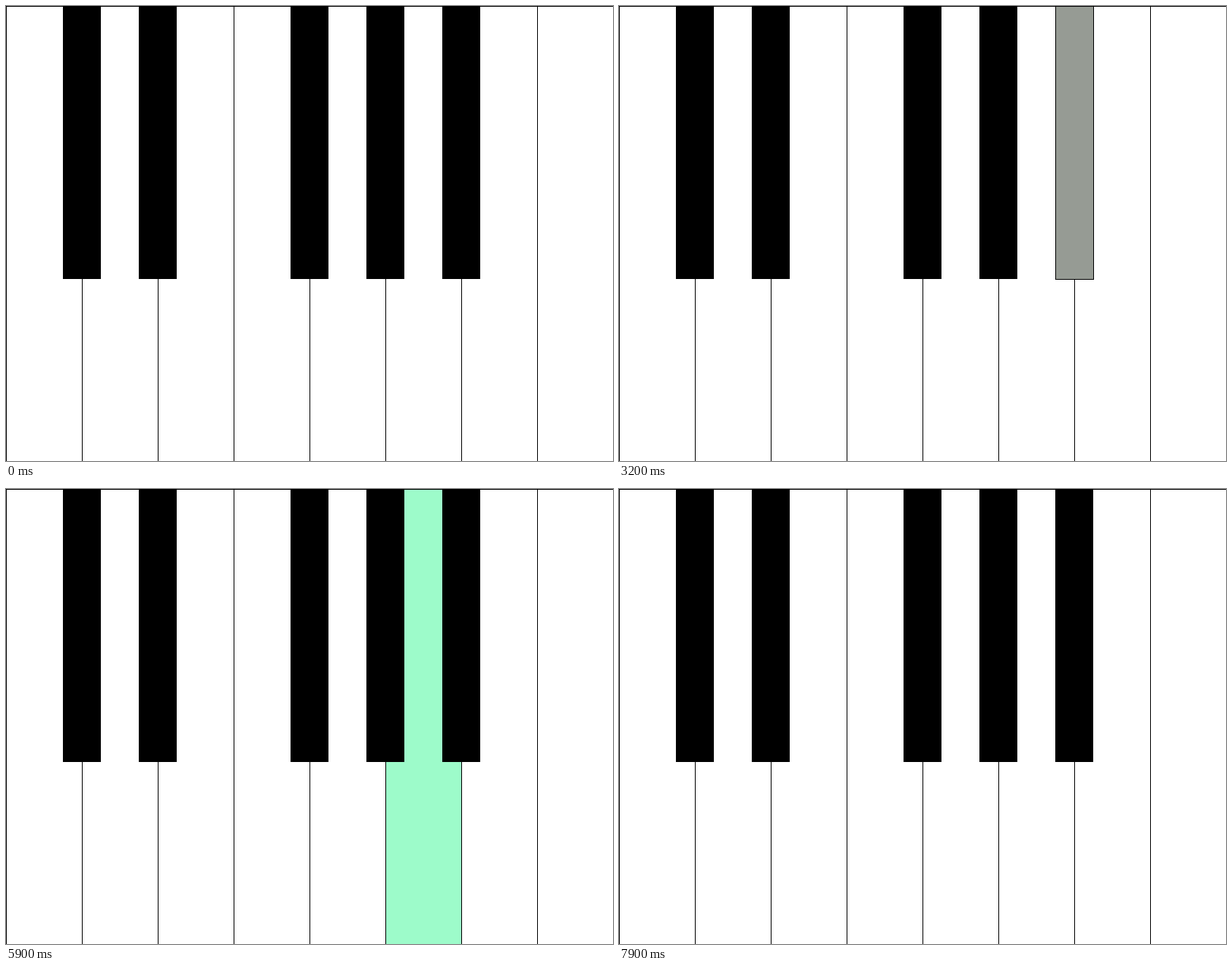
An HTML page with a canvas for the animation above (8000 ms loop, 800 by 600 pixels).

```html
<!DOCTYPE html>
<html>
<head>
<meta charset="utf-8">
<style>
  html, body { margin: 0; width: 100%; height: 100%; overflow: hidden; background: #fff; }
  canvas { display: block; }
</style>
</head>
<body>
<canvas id="stage" width="800" height="600"></canvas>
<script>
const ctx = document.getElementById('stage').getContext('2d');
const LOOP = 8000, GREEN = '#9dfbca', GRAY = '#969b94';
const names = 'CDEFGAB';
const sharps = ['C#', 'D#', 'F#', 'G#', 'A#'];

// [key, pressed at, released at] in ms
const notes = [
  ['G#', 200, 300], ['A#', 600, 5200], ['A', 1300, 1400],
  ['A', 2400, 2500], ['B', 2400, 2500], ['A', 3100, 3200], ['B', 3100, 3200],
  ['B', 3900, 4000], ['A', 4400, 4500], ['A', 5000, 5100],
  ['B', 5400, 5500], ['A', 5900, 6000], ['B', 6300, 6400],
  ['G#', 6600, 7100], ['G', 6900, 7000], ['F#', 7300, 7400],
  ['G#', 7500, 7900], ['G', 7700, 7800]
];

function box(x, w, h, fill) {
  ctx.fillStyle = fill;
  ctx.fillRect(x, 0, w, h);
  ctx.strokeRect(x + 0.5, 0.5, w, h);
}

function drawSharps() {
  ctx.fillStyle = '#000';
  for (const s of sharps) ctx.fillRect(names.indexOf(s[0]) * 100 + 75, 0, 50, 360);
}

function press(key) {
  const x = names.indexOf(key[0]) * 100;
  if (key[1]) {
    box(x + 75, 50, 360, GRAY);
  } else {
    // a pressed white key repaints the plain black keys above it
    box(x, 100, 600, GREEN);
    drawSharps();
  }
}

function draw(t) {
  ctx.strokeStyle = '#000';
  ctx.lineWidth = 1;
  for (let i = 0; i < 8; i++) box(i * 100, 100, 600, '#fff');
  drawSharps();
  for (const [key, on, off] of notes) if (t >= on && t < off) press(key);
}

const start = performance.now();
function tick() {
  draw((performance.now() - start) % LOOP);
  requestAnimationFrame(tick);
}
tick();
</script>
</body>
</html>
```
